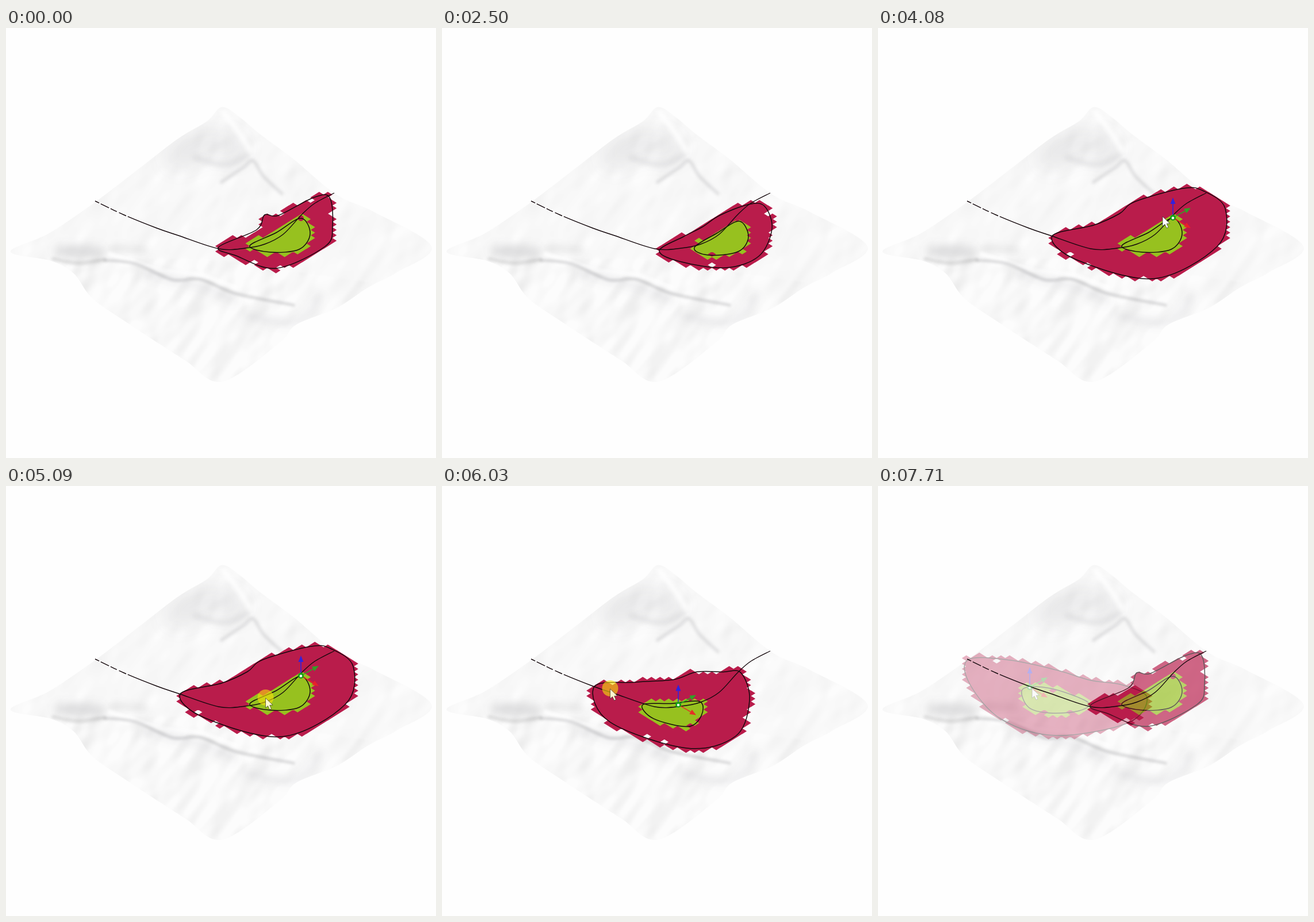
An HTML page with a canvas that plays this animation: 748 by 748 pixels, repeating every 7780 ms.

```html
<!DOCTYPE html>
<html lang="en">
<head>
<meta charset="utf-8">
<title>Terrain embankment</title>
<style>
  html, body { margin: 0; width: 100%; height: 100%; overflow: hidden; background: #fefefe; }
  canvas { display: block; width: 100vw; height: 100vh; }
</style>
</head>
<body>
<canvas id="stage" width="748" height="748"></canvas>
<script>
const SIZE = 748, LOOP = 7780;
const RED = '#b91c4b', GREEN = '#97c11f', INK = '#14080c';
const ctx = document.getElementById('stage').getContext('2d');

const pts = s => s.trim().split(/\s+/).map(p => p.split(',').map(Number));
const mix = (a, b, k) => a + (b - a) * k;
const mixPts = (a, b, k) => a.map((p, i) => [mix(p[0], b[i][0], k), mix(p[1], b[i][1], k)]);
const shift = (points, dx, dy) => points.map(([x, y]) => [x + dx, y + dy]);

// Seeded random number in 0..1 for a grid position
function hash(i, j) {
  let h = Math.imul(i, 374761393) + Math.imul(j, 668265263);
  h = Math.imul(h ^ (h >>> 13), 1274126177);
  return ((h ^ (h >>> 16)) >>> 0) / 4294967296;
}

function makeLayer() {
  const c = document.createElement('canvas');
  c.width = c.height = SIZE;
  return c;
}

// Catmull-Rom curve through the points
function curve(points, closed) {
  const path = new Path2D(), n = points.length;
  const at = i => closed ? points[(i + n) % n] : points[Math.max(0, Math.min(n - 1, i))];
  path.moveTo(...points[0]);
  for (let i = 0; i < (closed ? n : n - 1); i++) {
    const [a, b, c, d] = [at(i - 1), at(i), at(i + 1), at(i + 2)];
    path.bezierCurveTo(b[0] + (c[0] - a[0]) / 6, b[1] + (c[1] - a[1]) / 6,
      c[0] - (d[0] - b[0]) / 6, c[1] - (d[1] - b[1]) / 6, c[0], c[1]);
  }
  if (closed) path.closePath();
  return path;
}

function polygon(points) {
  const path = new Path2D();
  points.forEach(p => path.lineTo(...p));
  path.closePath();
  return path;
}

// ---- Terrain, painted once ----
const EDGE = curve(pts(`8,389 75,357 155,303 240,238 300,192 350,162 374,138 400,150 445,187
  500,228 575,290 640,320 740,380 680,425 632,450 575,487 505,516 475,548 376,615 310,577
  210,512 150,470 118,427 78,405`), true);

function noise(x, y) {
  const i = Math.floor(x), j = Math.floor(y);
  const ease = f => f * f * (3 - 2 * f);
  const u = ease(x - i), v = ease(y - j);
  return mix(mix(hash(i, j), hash(i + 1, j), u), mix(hash(i, j + 1), hash(i + 1, j + 1), u), v);
}

// Gullies run downhill, so the noise is stretched along that direction
function height(x, y) {
  const across = (x * .8 + y * .6) / 30, along = (y * .8 - x * .6) / 48;
  return noise(across, along) + noise(across * 2 + 9, along * 2) * .4;
}

function paintRelief() {
  const layer = makeLayer(), g = layer.getContext('2d');
  const image = g.createImageData(SIZE, SIZE);
  for (let y = 130; y < 620; y++) {
    for (let x = 0; x < SIZE; x++) {
      const rough = y > 400 + Math.max(0, x - 350) * .15 ? 34 : 16;
      const slope = (height(x - 3, y - 2) - height(x + 3, y + 2)) * rough;
      const tone = 248 + Math.max(-18, Math.min(4, slope)), k = (y * SIZE + x) * 4;
      image.data.fill(tone, k, k + 3);
      image.data[k + 3] = 255;
    }
  }
  g.putImageData(image, 0, 0);
  return layer;
}

function paintTerrain() {
  const layer = makeLayer(), g = layer.getContext('2d');
  g.fillStyle = '#fefefe';
  g.fillRect(0, 0, SIZE, SIZE);
  g.clip(EDGE);
  g.filter = 'blur(1.5px)';
  g.drawImage(paintRelief(), 0, 0);
  g.lineCap = g.lineJoin = 'round';

  const soft = (rgb, alpha, width, s) => {
    g.filter = `blur(${width / 2.5}px)`;
    g.strokeStyle = `rgba(${rgb},${alpha})`;
    g.lineWidth = width;
    g.stroke(curve(pts(s), false));
  };
  const dark = (...args) => soft('60,60,64', ...args);
  const light = (...args) => soft('255,255,255', ...args);

  // mountain and its spur
  dark(.09, 44, '300,222 350,198 395,208');
  dark(.08, 10, '330,226 380,238 420,222');
  light(.8, 9, '378,147 404,180 424,212');
  dark(.12, 6, '375,268 412,243 430,231 448,258 480,288');
  // basin
  dark(.14, 20, '95,388 160,390');
  dark(.15, 6, '82,402 125,409 172,403');
  dark(.07, 14, '185,384 240,386');
  // long ridge
  light(.8, 7, '180,393 270,422 335,429 400,452');
  dark(.17, 5, '172,404 225,410 290,438 338,437 400,462 500,482');
  dark(.06, 18, '245,426 340,450 395,472');
  // lower edge
  dark(.06, 16, '420,500 500,512 545,470');
  return layer;
}

// ---- Poses of the slope (red) and the platform (green) ----
// ragged: share of the cells on the outline that are missing
const pose = (red, green, ragged) => ({ red, green, ragged });

const start = pose(
  pts('370,381 436,351 450,325 474,326 535,295 563,295 568,345 555,380 470,418 400,396'),
  pts('424,379 470,356 513,331 529,358 510,385 460,390'), .2);
const narrow = pose(
  pts('370,383 412,359 445,342 475,322 525,303 553,306 566,345 543,393 485,413 405,402'),
  pts('434,377 473,352 512,331 528,358 510,384 458,390'), .04);
const lowered = pose(shift(narrow.red, 8, 4), shift(narrow.green, 5, 5), .04);
const wide = pose(
  pts('303,362 375,343 420,323 447,302 530,279 565,283 604,314 590,380 480,436 345,403'),
  start.green, .04);
const middle = pose(
  pts('267,350 340,342 405,337 445,323 490,323 521,324 537,372 515,435 430,457 295,412'),
  pts('351,381 400,379 450,375 453,400 430,419 370,405'), .04);
const left = pose(
  pts('157,302 230,303 310,320 370,338 425,346 468,368 435,412 310,434 215,406 160,345'),
  pts('252,353 300,352 365,376 350,391 300,395 262,385'), .04);

const POSES = [[950, start], [1300, narrow], [1900, narrow], [2200, lowered], [2500, lowered],
  [2650, narrow], [2800, start], [3250, wide], [5260, wide], [6030, middle], [6640, left]];
const GIZMO = [[5260, [513, 330]], [6030, [414, 381]], [6640, [264, 350]]];
const CURSOR = [[3700, [603, 335]], [4080, [495, 328]], [4700, [513, 330]],
  [5090, [452, 369]], [6030, [293, 353]], [6640, [268, 352]]];

// The two keys around t and the share of the second
function span(keys, t) {
  const next = keys.findIndex(k => t < k[0]);
  if (next <= 0) {
    const only = keys[next ? keys.length - 1 : 0][1];
    return [only, only, 0];
  }
  const [t0, a] = keys[next - 1], [t1, b] = keys[next];
  return [a, b, (t - t0) / (t1 - t0)];
}

function place(keys, t) {
  const [a, b, k] = span(keys, t);
  return mixPts([a], [b], k)[0];
}

// ---- Terrain cells ----
const HW = 7.52, HH = 4.7, OX = 447, OY = 323;

function cells(g, outline, ragged) {
  const out = new Path2D();
  g.lineWidth = 8;
  for (let i = -41; i <= 26; i++) {
    for (let j = -13; j <= 32; j++) {
      if ((i + j) & 1) continue;
      const x = OX + i * HW, y = OY + j * HH;
      const rim = g.isPointInStroke(outline, x, y);
      if (rim ? hash(i, j) < ragged : !g.isPointInPath(outline, x, y)) continue;
      out.moveTo(x - HW - .4, y);
      out.lineTo(x, y - HH - .3);
      out.lineTo(x + HW + .4, y);
      out.lineTo(x, y + HH + .3);
      out.closePath();
    }
  }
  return out;
}

// ---- Parts ----
const ROAD = curve(pts(`155,301 205,325 262,348 300,361 370,384 416,383 450,376
  482,359 514,325 537,305 571,287`), false);

function dot(g, x, y, r, color) {
  g.fillStyle = color;
  g.beginPath();
  g.arc(x, y, r, 0, 7);
  g.fill();
}

function drawRoad(g) {
  g.strokeStyle = INK;
  g.lineWidth = 1.4;
  g.setLineDash([8, 3, 16, 3, 12, 4, 14, 3, 500]);
  g.stroke(ROAD);
  g.setLineDash([]);
}

function drawArrow(g, dx, dy, color) {
  const len = Math.hypot(dx, dy), ux = dx / len, uy = dy / len;
  const bx = dx - ux * 11, by = dy - uy * 11;
  g.strokeStyle = g.fillStyle = color;
  g.lineWidth = 1.6;
  g.beginPath();
  g.moveTo(ux * 5, uy * 5);
  g.lineTo(bx, by);
  g.stroke();
  g.fill(polygon([[dx, dy], [bx - uy * 4.5, by + ux * 4.5], [bx + uy * 4.5, by - ux * 4.5]]));
}

function drawGizmo(g, [x, y]) {
  g.save();
  g.translate(x, y);
  g.globalAlpha = .9;
  drawArrow(g, 0, -35, '#2222ee');
  drawArrow(g, 31, -17, '#22b022');
  drawArrow(g, 31, 18, '#ee2028');
  g.globalAlpha = 1;
  dot(g, 0, 0, 5, '#18a018');
  dot(g, 0, 0.5, 2.2, '#ffffff');
  g.restore();
}

const ARROW = polygon(pts('0,0 0,17 4,13.5 7,20 10,18.6 7.2,12.4 12.5,12'));
function drawCursor(g, [x, y], pressed) {
  if (pressed) dot(g, x, y - 1, 14, 'rgba(250,225,10,.6)');
  g.save();
  g.translate(x, y);
  g.fillStyle = pressed ? '#fffbd0' : '#ffffff';
  g.strokeStyle = 'rgba(40,40,40,.65)';
  g.lineWidth = 1;
  g.fill(ARROW);
  g.stroke(ARROW);
  g.restore();
}

const terrain = paintTerrain();

function drawScene(g, t) {
  const [a, b, k] = span(POSES, t);
  const red = curve(mixPts(a.red, b.red, k), true);
  const green = curve(mixPts(a.green, b.green, k), true);
  const gizmoOn = t >= 3550;

  g.drawImage(terrain, 0, 0);
  g.lineJoin = 'round';
  g.fillStyle = RED;
  g.fill(cells(g, red, mix(a.ragged, b.ragged, k)));
  g.fillStyle = GREEN;
  g.fill(cells(g, green, .04));
  if (!gizmoOn) dot(g, 513, 331, 5, RED);

  drawRoad(g);
  g.lineWidth = 1.5;
  g.stroke(red);
  g.stroke(green);

  if (gizmoOn) drawGizmo(g, place(GIZMO, t));
  if (t >= 3700) drawCursor(g, place(CURSOR, t), t >= 4700 && t < 6600);
}

// ---- Clock: the picture advances in hard steps ----
const FADE = 7640;
function snap(t) {
  if (t < 1000) return 0;
  if (t < 3700) return 1000 + Math.floor((t - 1000) / 150) * 150;
  if (t < 6640) return 3700 + Math.floor((t - 3700) / 63.3 + .25) * 63.3;
  return t < FADE ? 6640 : FADE + Math.floor((t - FADE) / 70) * 70;
}

const opening = makeLayer();
drawScene(opening.getContext('2d'), 0);

const began = performance.now();
let shown = -1;
function tick() {
  const t = snap((performance.now() - began) % LOOP);
  if (t !== shown) {
    shown = t;
    drawScene(ctx, t);
    if (t >= FADE) {
      ctx.globalAlpha = (1 + (t - FADE) / 70) / 3;
      ctx.drawImage(opening, 0, 0);
      ctx.globalAlpha = 1;
    }
  }
  requestAnimationFrame(tick);
}
tick();
</script>
</body>
</html>
```
